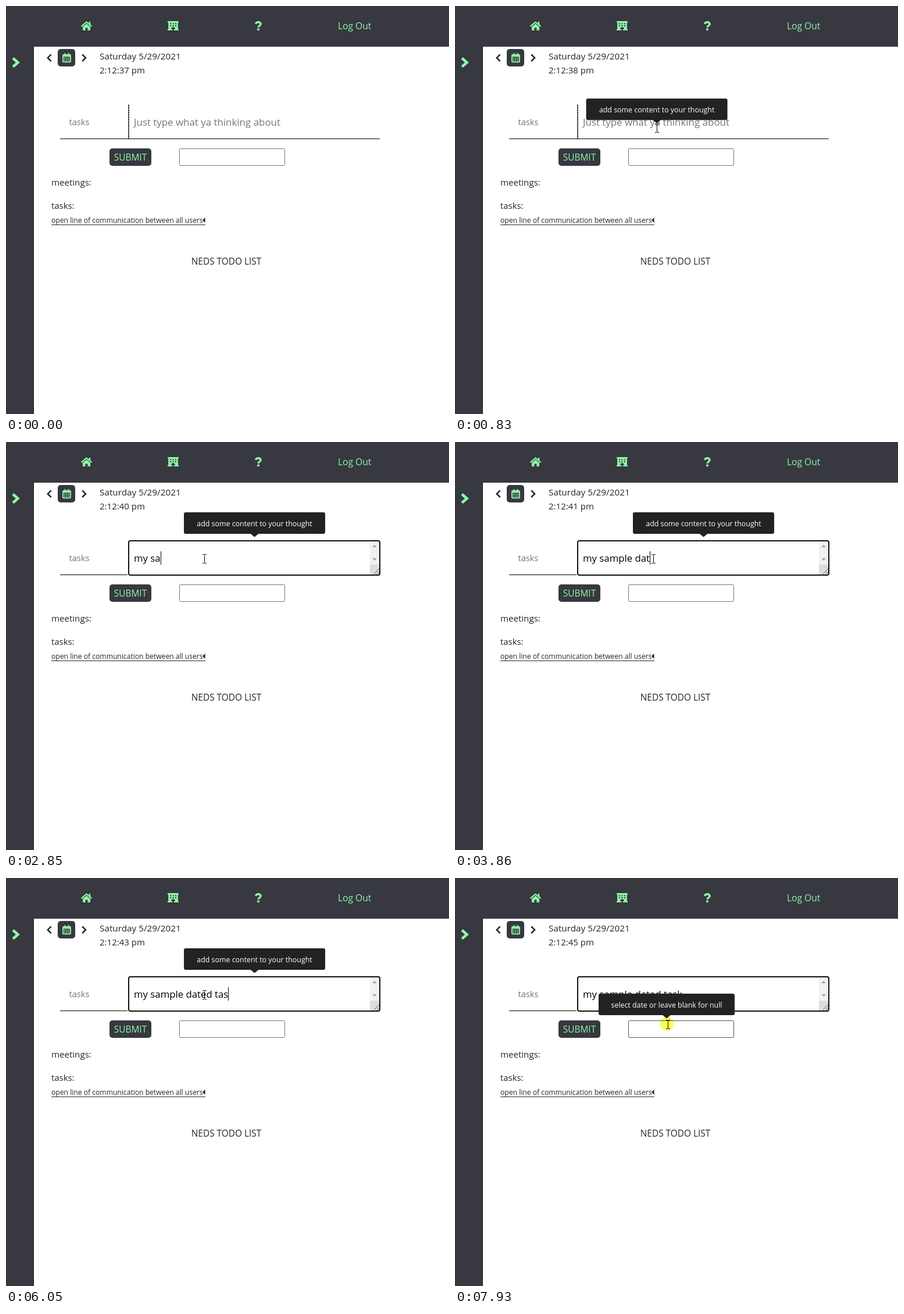
Write an HTML page with a canvas that moves like this. It is 762 px wide and 702 px high and loops after 8 s.

```html
<!DOCTYPE html>
<html lang="en">
<head>
<meta charset="utf-8">
<title>Todo planner</title>
<style>
html, body { margin: 0; width: 100%; height: 100%; overflow: hidden; background: #fff; }
canvas { display: block; }
</style>
</head>
<body>
<canvas id="stage" width="762" height="702"></canvas>
<script>
const ctx = document.getElementById('stage').getContext('2d');
const LOOP = 8000, FOCUS = 1110, BLINK = 530, STEP = 70;
const DARK = '#373840', GREEN = '#8ff7a7', INK = '#212529', GREY = '#757575';

// Typed characters with their times; '<' is a backspace.
const KEYS = 'my sample dated tqask<<<<ask';
const KEY_TIMES = [2240, 2510, 2580, 2710, 2850, 2980, 3050, 3200, 3270, 3400, 3500, 3580, 3720, 3920,
  4120, 4250, 4580, 4620, 4650, 4720, 4920, 5390, 5460, 5590, 5860, 5980, 6050, 6250];

// Pointer stops: time, x, y
const STOPS = [[130, 722, 668], [480, 537, 234], [620, 355, 224], [970, 341, 201],
  [7240, 341, 201], [7310, 352, 214], [7590, 366, 252]];

function text(str, x, y, size, color = INK, align = 'left') {
  ctx.font = `${size}px "Open Sans", "Noto Sans", sans-serif`;
  ctx.fillStyle = color;
  ctx.textAlign = align;
  ctx.fillText(str, x, y);
}

function box(x, y, w, h, color, radius = 0) {
  ctx.fillStyle = color;
  ctx.beginPath();
  ctx.roundRect(x, y, w, h, radius);
  ctx.fill();
}

function frame(x, y, w, h, color, width, radius) {
  ctx.strokeStyle = color;
  ctx.lineWidth = width;
  ctx.beginPath();
  ctx.roundRect(x, y, w, h, radius);
  ctx.stroke();
}

function fill(path, color) {
  ctx.fillStyle = color;
  ctx.fill(new Path2D(path));
}

function stroke(path, color, width, dash = []) {
  ctx.strokeStyle = color;
  ctx.lineWidth = width;
  ctx.setLineDash(dash);
  ctx.stroke(new Path2D(path));
  ctx.setLineDash([]);
}

function drawIcons() {
  // home
  stroke('M129.5 35.2L138.5 27.6L147.5 35.2', GREEN, 2.2);
  fill('M132 35.8L138.5 30.4L145 35.8V42H140.5V37.5H136.5V42H132Z', GREEN);
  box(142.8, 27, 2.4, 5, GREEN);
  // hotel
  box(278, 26, 19, 2.2, GREEN);
  box(279.2, 27, 16.6, 14, GREEN);
  box(278, 39.8, 19, 2.2, GREEN);
  for (const x of [282, 286.4, 290.8])
    for (const y of [29.4, 33]) box(x, y, 2.2, 2, DARK);
  fill('M284 39.8A3.5 3.5 0 0 1 291 39.8Z', DARK);
  box(286.2, 39.4, 2.6, 2.6, DARK);
  // help
  stroke('M429.6 31C430.6 26.4 438.2 26.8 438.2 31C438.2 33.8 434 33.6 434 37', GREEN, 3.4);
  box(431.9, 38.2, 4.2, 4.2, GREEN, 2.1);
  // chevrons
  stroke('M12 89.8L20.4 97.2L12 104.6', GREEN, 4.6);
  stroke('M77.6 83.4L71.8 89.2L77.6 95', INK, 2.5);
  stroke('M131.2 83.4L137 89.2L131.2 95', INK, 2.5);
  // calendar
  box(89, 74, 30, 30, DARK, 5);
  frame(98, 84, 13, 12.2, GREEN, 1.9, 1);
  box(98, 84, 13, 3.4, GREEN);
  box(100.5, 81, 2, 4, GREEN);
  box(106.5, 81, 2, 4, GREEN);
  for (const x of [100.2, 103.6, 107])
    for (const y of [89, 92.2]) box(x, y, 1.9, 1.8, GREEN);
}

function drawPage(t) {
  box(0, 0, 762, 702, '#fff');
  box(0, 0, 762, 70, DARK);
  box(0, 70, 48, 632, DARK);
  stroke('M47.5 70V702', '#000', 1, [1, 1]);
  drawIcons();
  text('Log Out', 571, 40, 15.6, GREEN);

  const seconds = 38 + Math.floor((t - 620) / 1005);
  text('Saturday 5/29/2021', 161, 92, 15.3);
  text(`2:12:${seconds} pm`, 161, 116, 15);

  box(178, 245, 72, 30, DARK, 5);
  text('SUBMIT', 214, 266, 15.4, GREEN, 'center');
  frame(298.5, 245.5, 181, 29, t >= 7520 ? '#4f4f4f' : '#767676', 1, 2);

  text('meetings:', 78, 309, 15.1);
  text('tasks:', 78, 349, 14.9);
  text('open line of communication between all users', 78, 373, 12.13);
  stroke('M78 376.5H343', INK, 1);
  fill('M338 368.5L342.5 364V373Z', INK);
  text('NEDS TODO LIST', 379, 445, 15.4, INK, 'center');
}

function typedAt(t) {
  let str = '', last = FOCUS;
  KEY_TIMES.forEach((time, i) => {
    if (time > t) return;
    str = KEYS[i] === '<' ? str.slice(0, -1) : str + KEYS[i];
    last = time;
  });
  return { str, last };
}

function drawThought(t) {
  const focused = t >= FOCUS;
  text('tasks', 108.5, 205, 14.7, GREY);
  stroke(`M93 228.5H${focused ? 209 : 643}`, '#000', 1);
  if (focused) {
    box(626, 171, 16, 40, '#f1f1f1');
    box(626, 211, 16, 18, '#dcdcdc');
    fill('M630 181H638L634 177Z', '#a3a3a3');
    fill('M630 200H638L634 204Z', '#a3a3a3');
    stroke('M632.5 227.5L642 218M637.5 227.5L642 223', '#555', 1);
    frame(211, 170, 432, 59, '#101010', 2, 3);
  } else {
    stroke('M211 170V228', '#000', 2, [2, 1]);
  }
  const { str, last } = typedAt(t);
  if (str) text(str, 220, 206, 16.75, '#000');
  else text('Just type what ya thinking about', 220, 206, 16.9, GREY);
  if (focused && Math.floor((t - last) / BLINK) % 2 === 0)
    box(220 + Math.round(str ? ctx.measureText(str).width : 0), 188, 1, 23, '#000');
}

function pointerAt(t) {
  let i = STOPS.findLastIndex(stop => stop[0] <= t);
  const [t0, x0, y0] = STOPS[i], [t1, x1, y1] = STOPS[i + 1] || [t0 + 1, x0, y0];
  const held = Math.floor((t - t0) / STEP) * STEP;
  const f = Math.min(1, held / (t1 - t0));
  return { x: x0 + (x1 - x0) * f, y: y0 + (y1 - y0) * f };
}

function drawTip(str, x, y, width, alpha) {
  ctx.globalAlpha = Math.max(0, Math.min(1, alpha));
  fill(`M${x - 7} ${y - 5.2}H${x + 7}L${x} ${y + 0.5}Z`, '#222');
  box(x - width / 2, y - 42, width, 37, '#222', 3);
  text(str, x, y - 18.5, 12.4, '#fff', 'center');
  ctx.globalAlpha = 1;
}

function drawTips(t, { x, y }) {
  const thought = 'add some content to your thought';
  if (t >= FOCUS && t < 7450) drawTip(thought, 427.5, 163, 243, 1);
  else if (t >= 480 && t < FOCUS) drawTip(thought, x + 0.5, y - 9, 243, (t - 480) / 175);
  else if (t >= 7520) drawTip('select date or leave blank for null', x - 2, y - 11, 234, (t - 7520) / 150);
}

function drawPointer(t, { x, y }) {
  if ((t >= 1040 && t < 1180) || t >= 7930) {
    ctx.globalCompositeOperation = 'multiply';
    box(x - 13.5, y - 13, 24, 24, '#ffff5e', 12);
    ctx.globalCompositeOperation = 'source-over';
  }
  const overThought = x > 211 && x < 643 && y > 170 && y < 230;
  const overDate = x > 298 && x < 480 && y > 243 && y < 275;
  ctx.save();
  ctx.translate(Math.round(x), Math.round(y));
  if (overThought || overDate) {
    stroke('M-3 -7.5H0M1 -7.5H4M.5 -7V7M-3 7.5H0M1 7.5H4', '#000', 1);
  } else {
    const arrow = 'M.5 .5V16.5L4.3 13L6.8 18.5L9 17.5L6.6 12.2H11.8Z';
    fill(arrow, '#fff');
    stroke(arrow, '#000', 1);
  }
  ctx.restore();
}

function draw(now) {
  const t = now % LOOP;
  drawPage(t);
  drawThought(t);
  if (t >= STOPS[0][0]) {
    const pointer = pointerAt(t);
    drawTips(t, pointer);
    drawPointer(t, pointer);
  }
  requestAnimationFrame(draw);
}
requestAnimationFrame(draw);
</script>
</body>
</html>
```
